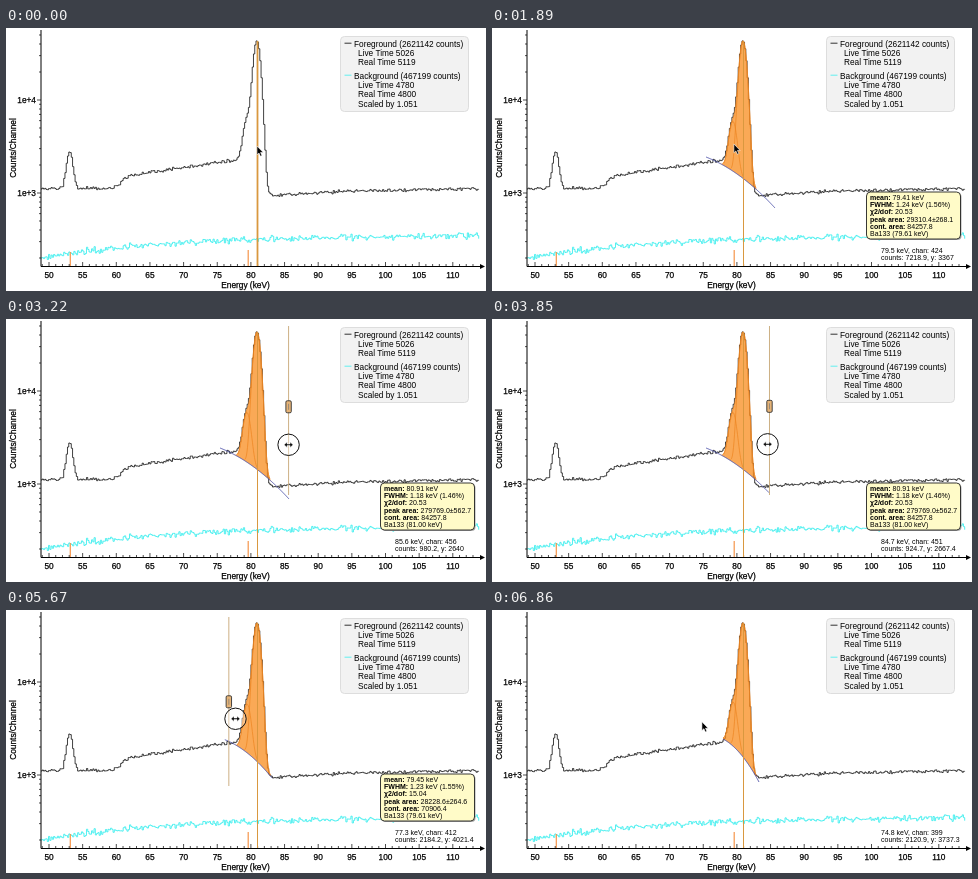
Write an HTML page that moves like this. It is 480 px wide and 263 px high and loops after 7430 ms.

```html
<!DOCTYPE html>
<html lang="en">
<head>
<meta charset="utf-8">
<title>Fitting spectrum peaks</title>
<style>
  html, body { margin: 0; width: 100%; height: 100%; overflow: hidden; background: #fff; }
  svg { display: block; width: 480px; height: 263px; font: 8.3px "Liberation Sans", Arial, sans-serif; }
  path, line { fill: none; }
  .axis text { stroke: #000; stroke-width: .25; }
  .small { font-size: 7px; }
  .bold { font-weight: bold; }
</style>
</head>
<body>
<svg viewBox="0 0 480 263">
  <g id="back"></g>
  <g id="live"></g>
</svg>
<script>
const LOOP = 7430, STEP = 70;
const $ = id => document.getElementById(id);

// Scales: energy in keV, counts on a log axis
const PX = 6.73, KEV = 0.188;
const X = e => 43 + (e - 50) * PX;
const E = x => 50 + (x - 43) / PX;
const Y = c => 165 - 93 * Math.log10(c / 1000);
const C = y => 1000 * 10 ** ((165 - y) / 93);
const channel = e => Math.floor(399.3 + (e - 74.8) / KEV);
const energy = ch => 74.8 + (ch - 399.3) * KEV;

// Markup helpers
const line = (x1, y1, x2, y2, color = '#000', w = 1) =>
  `<line x1="${x1}" y1="${y1}" x2="${x2}" y2="${y2}" stroke="${color}" stroke-width="${w}"/>`;
const path = (d, color, w) => `<path d="${d}" stroke="${color}" stroke-width="${w}"/>`;
const text = (x, y, s, anchor = 'start') => `<text x="${x}" y="${y}" text-anchor="${anchor}">${s}</text>`;
const poly = pts => 'M' + pts.map(p => p[0].toFixed(2) + ' ' + p[1].toFixed(2)).join('L');

// Curve rules
const clamp = k => Math.min(1, Math.max(0, k));
const smooth = k => k * k * (3 - 2 * k);
const mix = (a, b, k) => a + (b - a) * k;
const rise = (x, mid, w) => 1 / (1 + Math.exp((mid - x) / w));
const decay = (x, from, w) => Math.exp((from - x) / w);

const peak = (mean, fwhm, area, err) => {
  const s = fwhm / 2.355, amp = area * KEV / (s * 2.507);
  return { mean, fwhm, area, err, at: x => amp * Math.exp(-(((E(x) - mean) / s) ** 2) / 2) };
};

// Successive fits: start time, region l..r and the heights of its baseline ends
const main = peak(80.91, 1.19, 281663, '571.0'), side = peak(79.45, 1.23, 28228.6, '264.6');
const fits = [
  { from: 630, l: 214, r: 283, yl: 125, yr: 178, chi: '192.94', cont: '92441.2',
    peaks: [peak(80.86, 1.27, 290577, '569.1')] },
  { from: 1680, l: 214, r: 283, yl: 129, yr: 180, chi: '20.53', cont: '84257.8',
    peaks: [peak(80.91, 1.18, 279769, '562.7'), peak(79.41, 1.24, 29310.4, '268.1')] },
  { from: 4340, l: 214, r: 266, yl: 128, yr: 168, chi: '15.04', cont: '70906.4', peaks: [main, side] },
  { from: 5950, l: 231, r: 267, yl: 129, yr: 172, chi: '12.87', cont: '61282.5', peaks: [main, side] }
];
const baseline = (f, x) => {
  const k = (x - f.l) / (f.r - f.l);
  return mix(f.yl, f.yr, k) - 24 * k * (1 - k);
};

// Spectra: smooth level, peaks and seeded noise
let seed = 7;
const rand = () => (seed = (seed * 16807) % 2147483647) / 2147483647;
const noise = a => (rand() + rand() + rand() - 1.5) * a;
const foreLevel = x => {
  const left = 160.5 - 14 * rise(x, 116, 3.5) - .14 * Math.max(0, x - 128);
  return mix(left, 160 + 8 * decay(x, 265, 90), rise(x, 251, 4));
};
const backLevel = x => 207 + 23 * decay(x, 35, 130);
const low = peak(53.1, 1.01, 9500);

const counts = [];
let fore = 'M35 161', back = 'M35 230';
for (let ch = channel(E(35)) + 1; X(energy(ch + 1)) < 474; ch++) {
  const x = X(energy(ch)), mid = x + KEV * PX / 2;
  counts[ch] = C(foreLevel(mid) + noise(1.6)) + [main, side, low].reduce((sum, p) => sum + p.at(mid), 0);
  fore += `H${x.toFixed(2)}V${Y(counts[ch]).toFixed(2)}`;
  back += `H${x.toFixed(2)}V${(backLevel(mid) + noise(3)).toFixed(2)}`;
}

function drawLegend(y, color, rows) {
  return line(338.5, y - 3.5, 345.5, y - 3.5, color, .8)
    + rows.map((row, i) => text(i ? 352 : 348, y + i * 9.3, row)).join('');
}

function drawBack() {
  let axis = line(35, 2, 35, 238.5) + line(35, 238.5, 476, 238.5) + '<path d="M474 236l5 2.5l-5 2.5z" style="fill:#000"/>';
  for (let e = 49; e <= 113; e++) {
    axis += line(X(e), e % 5 ? 236 : 234, X(e), 238.5, '#000', .7);
    if (e % 5 === 0) axis += text(X(e), 250, e, 'middle');
  }
  for (let power = 2; power < 5; power++)
    for (let k = 1; k < 10; k++) {
      const y = Y(k * 10 ** power);
      if (y < 2 || y > 238) continue;
      axis += line(k > 1 ? 33 : 31, y, 35, y, '#000', .7);
      if (k === 1) axis += text(30, y + 3, '1e+' + power, 'end');
    }
  axis += text(239.5, 260, 'Energy (keV)', 'middle')
    + `<g transform="translate(10 120) rotate(-90)">${text(0, 0, 'Counts/Channel', 'middle')}</g>`;

  $('back').innerHTML = path(back, '#3fefef', .9) + path(fore, '#111', .8)
    + line(64.3, 224, 64.3, 238, '#f5954a', 1.2) + line(242.2, 222, 242.2, 238, '#f5954a', 1.2)
    + `<g class="axis">${axis}</g>`
    + '<rect x="334.5" y="8.5" width="128" height="75" rx="4" fill="#f2f2f2" stroke="#ddd"/>'
    + drawLegend(18.7, '#000', ['Foreground (2621142 counts)', 'Live Time 5026', 'Real Time 5119'])
    + drawLegend(50.7, '#3fefef', ['Background (467199 counts)', 'Live Time 4780', 'Real Time 4800', 'Scaled by 1.051']);
}

// Pointer glides: start, end, then the energy and counts reached
const glides = [
  [840, 1050, 79.55, 3367], [2100, 2520, 84, 2628.9], [2590, 2800, 85.6, 2640], [3570, 4200, 83.1, 2715],
  [4640, 5250, 75.6, 4021.4], [5530, 5740, 78.45, 4021.4], [6230, 6650, 74.8, 3737.3]
];
const pointer = t => glides.reduce((p, [a, b, e, c]) => {
  const k = smooth(clamp((t - a) / (b - a)));
  return { e: mix(p.e, e, k), c: mix(p.c, c, k) };
}, { e: 80.9, c: 3200 });

function drawFit(fit, l, r) {
  const xs = [];
  for (let x = l; x <= r; x += .5) xs.push(x);
  const base = xs.map(x => [x, baseline(fit, x)]);
  const curve = peaks => base.map(([x, y]) => [x, Y(C(y) + peaks.reduce((sum, p) => sum + p.at(x), 0))]);
  const outline = peaks => poly(curve(peaks).filter(([x, y]) => baseline(fit, x) - y > .8));
  const single = fit.peaks.length === 1;
  return `<path d="${poly([...curve(fit.peaks), ...base.slice().reverse()])}z" style="fill:#f98f22;fill-opacity:.76"/>`
    + fit.peaks.map(p => path(outline([p]), '#ec8420', single ? 1.4 : .7)).join('')
    + path(outline(fit.peaks), '#ec8420', .7)
    + path(poly(base), single ? '#f58a1f' : '#4a50a8', single ? 1.5 : .9);
}

function drawInfo(fit, e) {
  const i = fit.peaks.length > 1 && e < 80.18 ? 1 : 0, p = fit.peaks[i];
  const rows = [
    ['mean:', p.mean.toFixed(2) + ' keV'],
    ['FWHM:', `${p.fwhm.toFixed(2)} keV (${(100 * p.fwhm / p.mean).toFixed(2)}%)`],
    ['χ2/dof:', fit.chi],
    ['peak area:', p.area.toFixed(1) + '±' + p.err],
    ['cont. area:', fit.cont],
    ['', `Ba133 (${i ? '79.61' : '81.00'} keV)`]
  ];
  const box = (d, style) => `<rect x="${374.5 + d}" y="${164 + d}" width="94" height="47" rx="4" ${style}/>`;
  return box(1, 'fill="#aaa"') + box(0, 'fill="#fffbc8" stroke="#222" stroke-width=".9"')
    + rows.map(([name, value], n) =>
      text(378, 172 + n * 7.2, (name && `<tspan class="bold">${name}</tspan> `) + value)).join('');
}

const within = (t, ...spans) => spans.some(([a, b]) => t >= a && t < b);

function draw(t) {
  const { e, c } = pointer(t), x = X(e), y = Y(c);
  const edge = X(pointer(t - 50).e);
  const fit = fits.filter(f => t >= f.from).pop();
  let out = '';

  if (fit) {
    const l = fit === fits[2] && t >= 5530 ? Math.max(fit.l, edge - 4) : fit.l;
    const r = fit === fits[1] && t >= 3570 ? Math.min(fit.r, edge) : fit.r;
    out += drawFit(fit, l, r);
  }
  out += line(251.5, 13, 251.5, 238, '#d9983f', fit ? 1 : 1.8);

  const resizing = within(t, [2870, 4410], [5250, 6300]);
  if (resizing) {
    const top = y - 30 + (t > 5000 ? 7 : -14);
    out += line(edge, 7, edge, 176, '#c8a878', .9)
      + `<rect x="${edge - 2.7}" y="${top}" width="5.4" height="12" rx="1.3" fill="#e6b478" stroke="#333" stroke-width=".9"/>`
      + line(edge, top + 3, edge, top + 9, '#777', .7);
  }

  out += '<g class="small">';
  if (within(t, [630, 6370])) out += drawInfo(fit, e);
  if (t >= 490) {
    const seen = pointer(t - 22), ch = channel(seen.e);
    out += text(389, 225, `${+seen.e.toFixed(1)} keV, chan: ${ch}`)
      + text(389, 232, `counts: ${+counts[ch].toFixed(1)}, y: ${+seen.c.toFixed(1)}`);
  }
  out += '</g>';

  if (within(t, [420, 630], [1400, 1610], [3150, 4340], [5390, 5950]))
    out += `<circle cx="${x}" cy="${y}" r="10.7" fill="#fff" fill-opacity=".35" stroke="#111"/>`;
  out += `<g transform="translate(${x} ${y})">` + (resizing
    ? '<path d="M-4.5 0l3-2.7v1.9h3v-1.9l3 2.7l-3 2.7v-1.9h-3v1.9z" style="fill:#111" stroke="#fff" stroke-width=".5"/>'
    : '<path d="M0 0V8.8L2 7L3.5 10.3L5 9.6L3.6 6.5H6.3Z" style="fill:#000" stroke="#fff" stroke-width=".6"/>') + '</g>';
  $('live').innerHTML = out;
}

drawBack();
const start = performance.now();
let shown = -1;
function tick() {
  const t = Math.floor((performance.now() - start) % LOOP / STEP) * STEP;
  if (t !== shown) draw(shown = t);
  requestAnimationFrame(tick);
}
tick();
</script>
</body>
</html>
```
